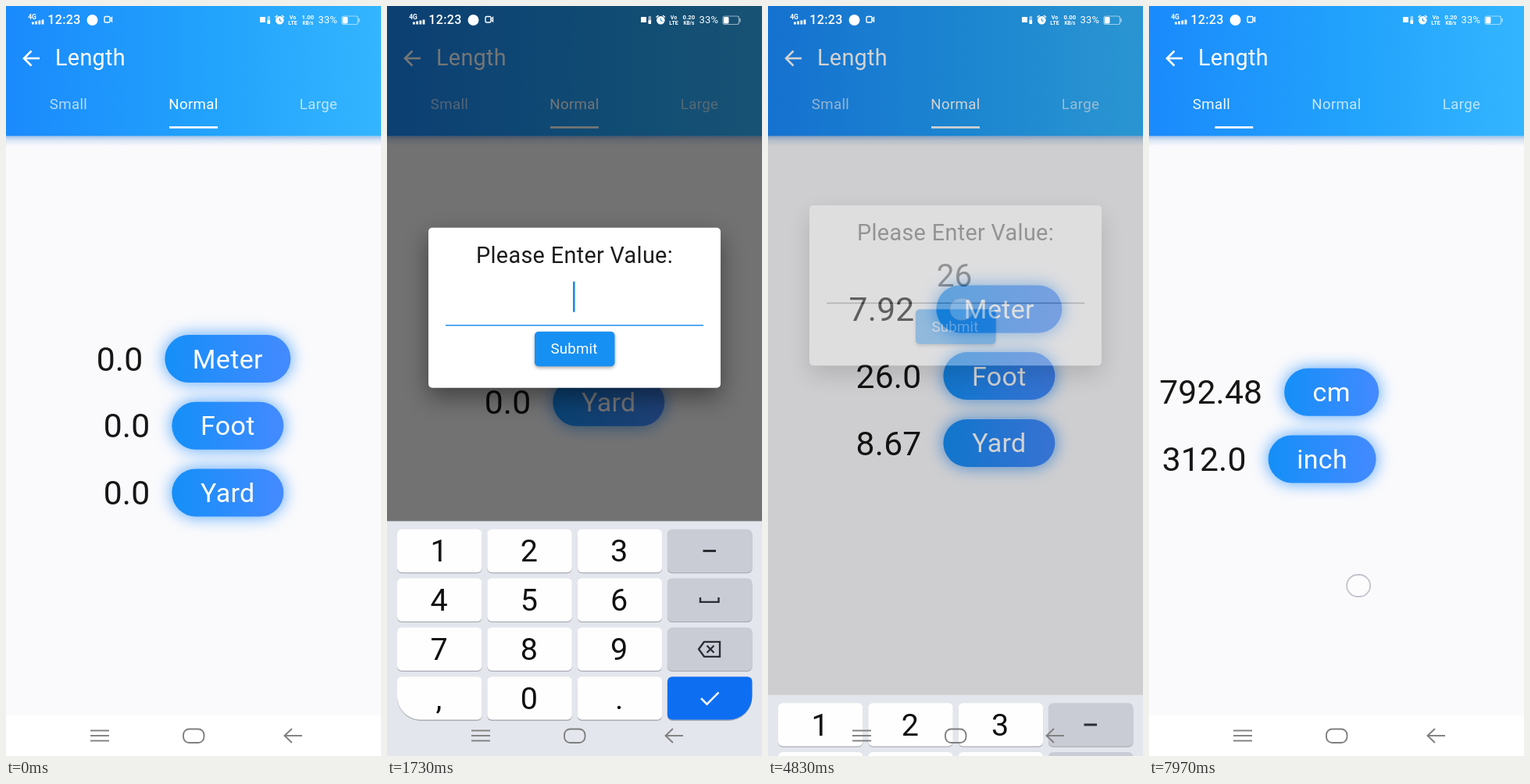
Write an HTML page with a canvas that moves like this. It is 480 px wide and 960 px high and loops after 8000 ms.

```html
<!DOCTYPE html>
<html lang="en">
<head>
<meta charset="utf-8">
<title>Length converter</title>
<style>
html, body { margin: 0; width: 100%; height: 100%; overflow: hidden; background: #fafafc; }
canvas { display: block; width: 100vw; height: 100vh; }
</style>
</head>
<body>
<canvas id="stage" width="480" height="960"></canvas>
<script>
const W = 480, H = 960, LOOP = 8000, NAV_TOP = 908, HEAD = 166.5;
const VALUE_SIZE = 42.67, VALUE_GAP = 28;
const screen2d = document.getElementById('stage').getContext('2d');
const layer = document.createElement('canvas');
layer.width = W;
layer.height = H;
const layer2d = layer.getContext('2d');
let g = screen2d;

const clamp = v => Math.max(0, Math.min(1, v));
const span = (t, a, b) => clamp((t - a) / (b - a));
const mix = (a, b, p) => a + (b - a) * p;
const easeOut = p => 1 - Math.pow(1 - p, 3);
const smooth = p => p * p * (3 - 2 * p);

function setFont(size, weight = 400, space = 0) {
  g.font = `${weight} ${size}px Roboto, Arial, sans-serif`;
  g.letterSpacing = space + 'px';
}

function text(str, x, y, size, color, o = {}) {
  setFont(size, o.weight, o.space);
  g.textAlign = o.align || 'center';
  g.fillStyle = color;
  g.fillText(str, x, y);
}

function box(x, y, w, h, r, fill) {
  g.beginPath();
  g.roundRect(x, y, w, h, r);
  if (fill) {
    g.fillStyle = fill;
    g.fill();
  }
}

function line(points, color, width) {
  g.beginPath();
  points.forEach(([x, y], i) => i ? g.lineTo(x, y) : g.moveTo(x, y));
  g.strokeStyle = color;
  g.lineWidth = width;
  g.stroke();
}

function shadow(color, blur, dy) {
  g.shadowColor = color;
  g.shadowBlur = blur;
  g.shadowOffsetY = dy;
}
const noShadow = () => shadow('transparent', 0, 0);

// ---- motion ----

function keyboardTop(t, openLag = 0, closeLag = 0) {
  const up = easeOut(span(t - openLag, 1480, 1880));
  const down = easeOut(span(t - closeLag, 4734, 4994));
  return mix(960, 643, up - down);
}

const inset = top => Math.max(0, NAV_TOP - top);

function dialogAlpha(t) {
  return easeOut(span(t, 1330, 1480)) * (1 - span(t, 4730, 4880));
}

const lastX = t => 395 - 126 * Math.max(0, t - 7820) / 150;

// Pager position: 0 is Small, 1 is Normal.
function pagePos(t) {
  if (t < 1100) {
    return 1 - 90 / W * smooth(span(t, 60, 340)) * (1 - easeOut(span(t, 380, 880)));
  }
  if (t < 7000) {
    const drag = 200 * smooth(span(t, 6130, 6400));
    return 1 - mix(drag, W, easeOut(span(t, 6370, 6910))) / W;
  }
  return Math.max(0, 395 - lastX(t) - 40.5) / W;
}

const touches = [
  { from: 40, to: 370, at: t => [mix(190, 300, smooth(span(t, 50, 340))), 744] },
  { from: 1170, to: 1290, at: () => [283, 540] },
  { from: 2900, to: 3060, at: () => [182, 692] },
  { from: 3470, to: 3660, at: () => [298, 752] },
  { from: 4500, to: 4760, at: () => [248, 388] },
  { from: 6100, to: 6380, at: t => [mix(168, 385, smooth(span(t, 6110, 6400))), 744] },
  { from: 7800, to: 8100, at: t => [lastX(t), 742] }
];

function speed(t) {
  return t < 1100 ? '1.00' : t < 4100 ? '0.20' : t < 7130 ? '0.00' : '0.20';
}

const caretOn = t => t < 2300 || (t >= 2900 && t < 4100) || t >= 4600;

// ---- app page ----

function pill(x, cy, w, label) {
  const fill = g.createLinearGradient(x, 0, x + w, 0);
  fill.addColorStop(0, '#148ff8');
  fill.addColorStop(1, '#448aff');
  shadow('rgba(35,140,250,0.8)', 21, 0);
  box(x, cy - 30.5, w, 61, 30.5, fill);
  noShadow();
  text(label, x + w / 2, cy + 12, 34, '#fff', { space: 0.33 });
}

function row(cx, cy, value, label, w) {
  setFont(VALUE_SIZE, 400, 0.15);
  const tw = g.measureText(value).width;
  const x = cx - (tw + VALUE_GAP + w) / 2;
  text(value, x, cy + 15.2, VALUE_SIZE, '#161616', { space: 0.15, align: 'left' });
  pill(x + tw + VALUE_GAP, cy, w, label);
}

function pages(t) {
  const done = t >= 4730;
  const pos = pagePos(t);
  const lift = inset(keyboardTop(t, 40, 52)) / 2;
  const small = 240 - pos * W, normal = small + W;
  if (pos > 0) {
    row(normal, 451.5 - lift, done ? '7.92' : '0.0', 'Meter', 161);
    row(normal, 537.2 - lift, done ? '26.0' : '0.0', 'Foot', 143);
    row(normal, 623 - lift, done ? '8.67' : '0.0', 'Yard', 143);
  }
  if (pos < 1) {
    row(small, 494.2 - lift, done ? '792.48' : '0.0', 'cm', 121);
    row(small, 580 - lift, done ? '312.0' : '0.0', 'inch', 138);
  }
}

function header(pos) {
  const shade = g.createLinearGradient(0, HEAD, 0, HEAD + 13);
  shade.addColorStop(0, 'rgba(35,110,200,0.4)');
  shade.addColorStop(0.45, 'rgba(50,120,200,0.15)');
  shade.addColorStop(1, 'rgba(50,120,200,0)');
  g.fillStyle = shade;
  g.fillRect(0, HEAD, W, 13);

  const fill = g.createLinearGradient(0, 0, W, 0);
  fill.addColorStop(0, '#1a8afc');
  fill.addColorStop(0.55, '#22a3fc');
  fill.addColorStop(1, '#34b5ff');
  g.fillStyle = fill;
  g.fillRect(0, 0, W, HEAD);

  line([[43, 67], [23, 67]], '#fff', 2.6);
  line([[32.5, 57.5], [23, 67], [32.5, 76.5]], '#fff', 2.6);
  text('Length', 63, 76, 28.8, '#fff', { space: 0.3, align: 'left' });

  ['Small', 'Normal', 'Large'].forEach((name, i) => {
    const a = 0.68 + 0.32 * clamp(1 - Math.abs(pos - i));
    text(name, 80 + 160 * i, 132, 18.67, `rgba(255,255,255,${a})`, { space: 0.35 });
  });
  const left = mix(57, 209, pos), right = mix(103, 271, pos);
  g.fillStyle = '#fff';
  g.fillRect(left, 154, right - left, 2.7);
}

// ---- dialog ----

function dialog(t) {
  const mid = (34 + NAV_TOP - inset(keyboardTop(t, 119, 86))) / 2;
  const y = mid - 102.5;
  shadow('rgba(0,0,0,0.42)', 30, 12);
  box(53, y, 374, 205, 5, '#fff');
  noShadow();
  text('Please Enter Value:', 240, y + 45, 28.8, '#1c1c1c', { space: 0.33 });

  const value = t < 2900 ? '' : t < 3600 ? '2' : '26';
  text(value, 238.5, y + 104, 40.5, '#1c1c1c');
  if (caretOn(t) && t < 4730) {
    g.fillStyle = '#1f8ae6';
    g.fillRect(238 + g.measureText(value).width / 2, y + (value ? 67.5 : 69), 2.6, value ? 43 : 39);
  }
  g.fillStyle = t < 4730 ? '#1f90ee' : '#77777c';
  g.fillRect(75, y + 124.3, 330, 1.5);

  shadow('rgba(0,0,0,0.35)', 4, 2);
  box(189, y + 133, 102.5, 44.5, 5, '#1790f4');
  noShadow();
  text('Submit', 239.5, y + 161.8, 18.67, '#fff', { space: 0.2 });
}

// ---- keyboard ----

const KEYS = ['123-', '456_', '789<', ',0.>'];

function keyIcon(key, cx, cy) {
  const ink = '#2b2d33';
  if (key === '-') line([[404.5, cy], [421, cy]], ink, 3);
  if (key === '_') line([[401, cy - 3.5], [401, cy + 2.5], [424.5, cy + 2.5], [424.5, cy - 3.5]], ink, 2.4);
  if (key === '<') {
    line([[399, cy], [406, cy - 9.5], [426, cy - 9.5], [426, cy + 9.5], [406, cy + 9.5], [399, cy], [406, cy - 9.5]], ink, 2.3);
    line([[409.5, cy - 4.5], [418.5, cy + 4.5]], ink, 2.3);
    line([[409.5, cy + 4.5], [418.5, cy - 4.5]], ink, 2.3);
  }
  if (key === '>') line([[402, cy], [409.5, cy + 7.5], [424.5, cy - 7.5]], '#fff', 2.5);
}

function keyboard(top) {
  if (top >= H) return;
  g.fillStyle = '#e4e6ed';
  g.fillRect(0, top, W, H - top);
  KEYS.forEach((keys, r) => [...keys].forEach((key, c) => {
    const x = 13 + 115.3 * c, y = top + 10.3 + 62.9 * r;
    const cx = x + 54, cy = y + 27.8;
    const round = key === ',' ? [6, 6, 6, 30] : key === '>' ? [6, 6, 30, 6] : 6;
    const fill = key === '>' ? '#0e6ef2' : c === 3 ? '#c9ccd5' : '#fefefe';
    box(x, y + 1.3, 108.5, 55.2, round, '#abadb5');
    box(x, y, 108.5, 55.2, round, fill);
    if (c === 3) keyIcon(key, cx, cy);
    else text(key, cx - 0.5, cy + 14, 39.5, '#101010');
  }));
}

// ---- system bars ----

function statusBar(t) {
  const ink = '#fff';
  const tiny = (s, x, y, size) => text(s, x, y, size, ink, { weight: 700 });
  tiny('4G', 33.5, 17, 8.5);
  g.fillStyle = ink;
  for (let i = 0; i < 4; i++) {
    g.fillRect(33 + 4.2 * i, 20.5 - i, 2.8, 3 + i);
  }
  text('12:23', 74.5, 23.2, 16, ink, { weight: 500, space: 0.4 });
  box(103.5, 11, 14, 14, 7, ink);

  box(126, 13.5, 7, 7.5, 1.5);
  g.strokeStyle = ink;
  g.lineWidth = 1.4;
  g.stroke();
  line([[133, 17.2], [135.6, 14.5], [135.6, 20], [133, 17.2]], ink, 1.2);

  box(325, 14, 7, 7, 0, ink);
  box(334.5, 13, 3.6, 10, 1, 'rgba(255,255,255,0.55)');
  box(334.5, 18, 3.6, 5, 1, ink);

  box(345, 13, 10.6, 10.6, 5.3, ink);
  line([[344.5, 14.5], [347.5, 12]], ink, 1.5);
  line([[353, 12], [356, 14.5]], ink, 1.5);
  line([[350.3, 15.5], [350.3, 18.6], [352.6, 19.5]], '#2a98dc', 1.1);

  tiny('Vo', 367, 16.5, 7);
  tiny('LTE', 367, 23.6, 7);
  tiny(speed(t), 386.3, 16.8, 7.8);
  tiny('KB/s', 386.3, 23.6, 6.4);
  text('33%', 411.8, 22.4, 13, ink, { space: 0.2 });

  box(430, 13, 20.5, 10.5, 2.5);
  g.strokeStyle = 'rgba(255,255,255,0.55)';
  g.lineWidth = 1.2;
  g.stroke();
  box(431, 14, 6.5, 8.5, 1.5, ink);
  g.fillStyle = 'rgba(255,255,255,0.55)';
  g.fillRect(451.3, 16, 1.5, 4.5);
}

function navIcons() {
  const ink = '#7f7f80';
  for (const y of [927.5, 934, 940.5]) line([[108, y], [132, y]], ink, 1.9);
  box(227, 925.5, 26.5, 17.5, 7.5);
  g.stroke();
  line([[379, 934], [356.5, 934]], ink, 1.9);
  line([[366, 925], [356.5, 934], [366, 943]], ink, 1.9);
}

function touchDots(t) {
  for (const touch of touches) {
    if (t < touch.from) continue;
    const a = 1 - span(t, touch.to, touch.to + 140);
    if (!a) continue;
    const [x, y] = touch.at(t);
    g.globalAlpha = a;
    box(x - 15, y - 14, 30, 28, 14, 'rgba(255,255,255,0.45)');
    g.strokeStyle = 'rgba(140,140,160,0.5)';
    g.lineWidth = 1.8;
    g.stroke();
    g.globalAlpha = 1;
  }
}

function draw(t) {
  g = screen2d;
  g.fillStyle = '#fafafc';
  g.fillRect(0, 0, W, H);
  pages(t);
  header(pagePos(t));

  const a = dialogAlpha(t);
  if (a > 0) {
    g.fillStyle = `rgba(0,0,0,${0.54 * a})`;
    g.fillRect(0, 0, W, H);
    g = layer2d;
    g.clearRect(0, 0, W, H);
    dialog(t);
    g = screen2d;
    g.globalAlpha = a;
    g.drawImage(layer, 0, 0);
    g.globalAlpha = 1;
  }

  g.fillStyle = '#fff';
  g.fillRect(0, NAV_TOP, W, H - NAV_TOP);
  keyboard(keyboardTop(t));
  statusBar(t);
  navIcons();
  touchDots(t);
}

const start = performance.now();
function tick() {
  draw((performance.now() - start) % LOOP);
  requestAnimationFrame(tick);
}
tick();
</script>
</body>
</html>
```
